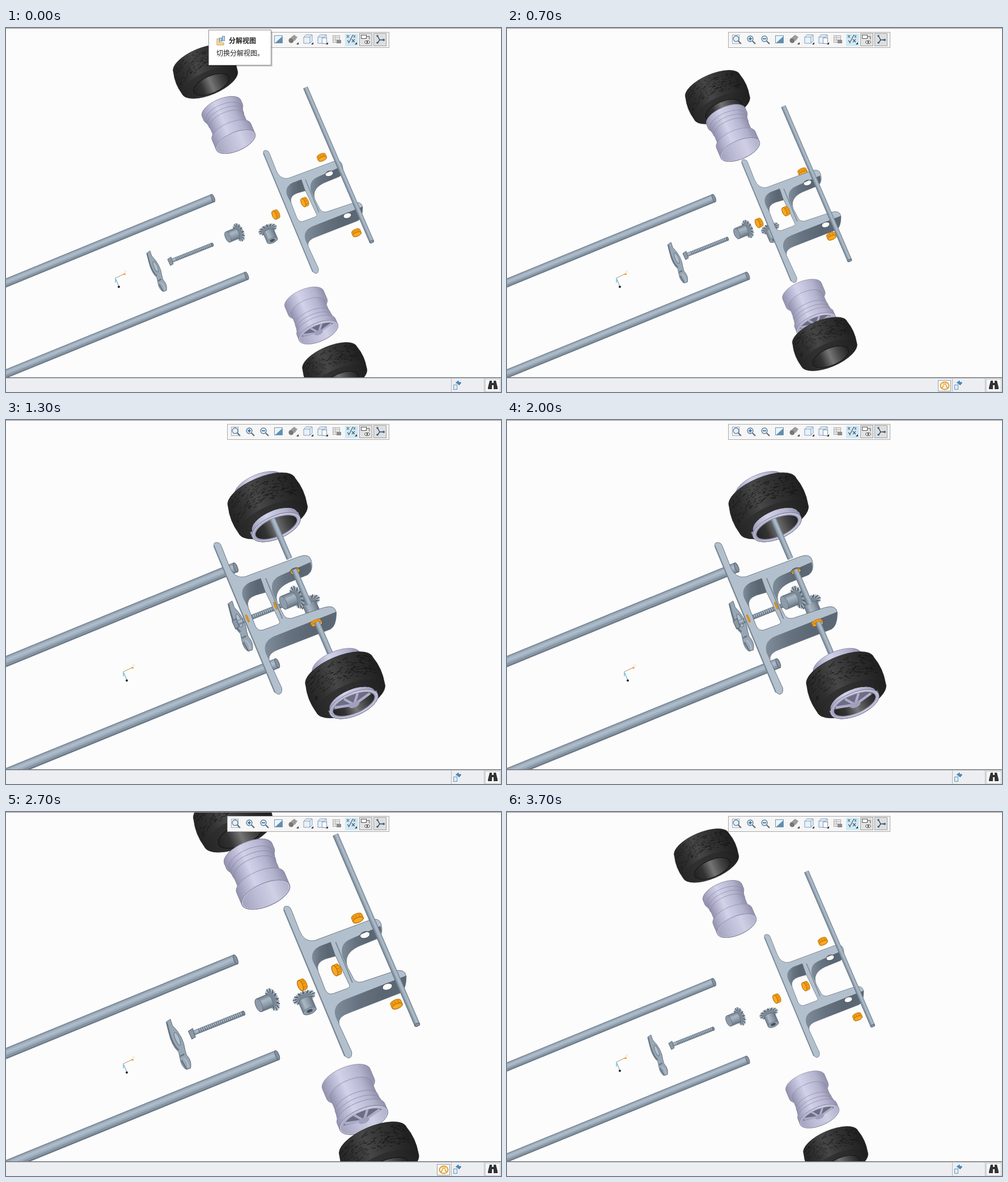
An HTML page that plays this animation: 873x642 px, repeating every 3800 ms.

```html
<!DOCTYPE html>
<html lang="zh">
<head>
<meta charset="utf-8">
<style>
html, body { margin: 0; width: 100%; height: 100%; overflow: hidden; background: #fcfcfc; }
svg { display: block; }
text { font: 12px "Noto Sans CJK SC", "Noto Sans CJK", sans-serif; fill: #222; }
</style>
</head>
<body>
<svg id="stage" width="873" height="642" viewBox="0 0 873 642" fill="none"></svg>
<script>
const LOOP = 3800;
const ZOOM = 1.2333;
const TILT = -23;
const EDGE = '#5d6975';

// Travel of each part from exploded to assembled.
const travel = {
  bracket: [-120, 48.5], axle: [-122, 99],
  tyreA: [59, 135], hubA: [18, 42], tyreB: [-58, -134], hubB: [-17, -41],
  bearing1: [-107, 77], bearing2: [-105, 48], bearing3: [-94, 44], bearing4: [-138, 18],
  gear1: [42, -18], gear2: [8, -6], bolt: [75, -31], arm: [106, -45]
};

let seed = 7;
const random = () => (seed = (seed * 16807) % 2147483647) / 2147483647;

const part = (name, body) => `<g data-part="${name}">${body}</g>`;
const place = (x, y, angle, body) => `<g transform="translate(${x} ${y}) rotate(${angle})">${body}</g>`;
const rect = (x, y, w, h, fill, stroke = 'none') =>
  `<rect x="${x}" y="${y}" width="${w}" height="${h}" fill="${fill}" stroke="${stroke}"/>`;
const path = (d, fill, stroke = 'none', w = 1, more = '') =>
  `<path d="${d}" fill="${fill}" stroke="${stroke}" stroke-width="${w}" ${more}/>`;
const oval = (x, y, rx, ry, fill, stroke = 'none', more = '') =>
  `<ellipse cx="${x}" cy="${y}" rx="${rx}" ry="${ry}" fill="${fill}" stroke="${stroke}" ${more}/>`;

function gradient(id, ...stops) {
  const list = stops.map((c, i) => `<stop offset="${i / (stops.length - 1)}" stop-color="${c}"/>`);
  return `<linearGradient id="${id}">${list.join('')}</linearGradient>`;
}

function tube(x1, y1, x2, y2, w, capRx) {
  const len = Math.hypot(x2 - x1, y2 - y1), nx = (y2 - y1) / len, ny = (x1 - x2) / len;
  const line = (shift, width, color) => {
    const dx = nx * shift * w, dy = ny * shift * w;
    return path(`M${x1 + dx} ${y1 + dy}L${x2 + dx} ${y2 + dy}`, 'none', color, width);
  };
  const angle = Math.atan2(y2 - y1, x2 - x1) * 180 / Math.PI;
  return line(0, w, '#687582') + line(.04, w * .84, '#8695a4') + line(.1, w * .55, '#9dadbc') +
    line(.12, w * .25, '#acbac9') +
    place(x2, y2, angle, oval(0, 0, capRx, w / 2 - .4, '#8492a0', EDGE, 'class="cap"'));
}

// Cylinder section seen from its lower end.
const band = (y0, y1, r, fill, squash = .445) =>
  path(`M${-r} ${y0}A${r} ${r * squash} 0 0 1 ${r} ${y0}V${y1}A${r} ${r * squash} 0 0 1 ${-r} ${y1}Z`,
    fill, '#85859e', .6);

function hub(x, y, spoked) {
  const sections = spoked
    ? [[-32, -16, 37], [-15, 5, 32], [6, 13, 33], [14, 20, 34], [22, 32, 37]]
    : [[-32, -24, 37], [-23, -17, 34], [-16, -10, 33], [-9, 12, 32], [13, 32, 37]];
  let body = sections.map(([a, b, r]) => band(a, b, r, 'url(#lavender)')).join('');
  body += oval(0, 32, 37, 16.5, '#c6c6df', '#77778f', 'stroke-width=".7"');
  body += oval(0, 32, 35.5, 15.2, 'url(#bowl)');
  body += oval(0, 32, 32, 13.2, 'url(#well)', '#8b8ba6', 'class="core"');
  if (spoked) {
    body += path('M-30 28A32 13 0 0 1 30 28L0 34Z', '#6d6d84');
    body += path('M0 33L-27 26M0 33L-10 20M0 33L11 20M0 33L27 27', 'none', '#adadca', 3.5);
    body += oval(0, 33, 8, 4, '#a0a0bd');
  }
  return place(x, y, TILT, body);
}

const casing = 'M-52-20A52 21 0 0 1 52-20Q58 0 53 21A53 22 0 0 1-53 21Q-58 0-52-20Z';

function tyre(x, y) {
  let tread = '';
  for (let i = 0; i < 170; i++) {
    const u = random() * 1.86 - .95;
    const v = random() * 31 - 17 - 19 * Math.sqrt(1 - u * u);
    tread += `M${(52 * u).toFixed(1)} ${v.toFixed(1)}l${(2 + random() * 3).toFixed(1)} ${(2.5 * u).toFixed(1)}`;
  }
  return place(x, y, TILT, path(casing, 'url(#rubber)', '#202020', .6) +
    path(tread, 'none', '#161616', .7, 'clip-path="url(#casing)"') +
    oval(0, 22, 51, 20.5, 'url(#shoulder)') + oval(1, 26, 34, 15, 'url(#well)', '#151515'));
}

function gear(x, y, angle, bored) {
  let body = oval(0, -4, 14, 8, '#7b8997');
  for (let i = 0; i < 26; i++) {
    const a = i * Math.PI / 13, c = Math.cos(a), s = Math.sin(a);
    body += path(`M${c * 11} ${-4 + s * 5}L${c * 17} ${-4 + s * 9}`, 'none', i % 2 ? '#a3b1be' : '#53606c', 1.7);
  }
  body += path('M-10-1Q0-6 10-1V17A10 4.5 0 0 1-10 17Z', 'url(#steel)', EDGE, .6);
  body += oval(0, 17, 10, 4.5, '#8d9baa', EDGE, 'stroke-width=".6"');
  if (bored) body += oval(0, 17, 4.5, 2.2, '#46515c');
  return place(x, y, angle, body);
}

function bearing(name, x, y, angle, seat) {
  let body = path('M-8-3A8 3.5 0 0 1 8-3V3A8 3.5 0 0 1-8 3Z', '#f59c10', '#a86a08', .7);
  body += path('M-5-5V2M-1-5V2M4-5V2', 'none', '#c97c08', .8);
  body += oval(0, 3, 8, 3.5, '#f9a71f', '#9a620c', 'stroke-width=".7"');
  return part(name, place(x, y, angle, `<g class="ring" data-seat="${seat}">${body}</g>`));
}

function bracket() {
  const outline = 'M454 221Q453 215 459 216Q463 216 465 222L476 250Q483 268 498 265L576 236Q590 231 593 241' +
    'Q597 256 588 262L561 273Q538 284 545 303L554 320Q558 326 566 324L611 309Q627 304 629 316' +
    'Q629 336 620 340L548 368Q530 374 533 385L551 424Q552 433 546 433L541 430Z';
  const opening = 'M503 309Q499 296 514 291L528 287L548 329Q549 332 543 334L524 341Q517 343 513 335Z';
  const eye = (x, y) => `M${x - 7} ${y + 2}a7 4.5-18 0 1 14-4a7 4.5-18 0 1-14 4Z`;
  const eyeA = eye(570, 257), eyeB = eye(602, 331);
  const wall = d => path(d, 'url(#wall)', 'none', 1, 'fill-rule="evenodd"');
  return path(outline + opening + eyeA + eyeB, '#b2c0ce', EDGE, .7, 'fill-rule="evenodd"') +
    wall('M496 296Q490 281 505 273L521 267L528 287L514 291Q499 296 503 309Z') +
    wall('M545 303L538 288Q533 270 549 263L592 244Q596 256 588 262L561 273Q538 284 545 303Z' + eyeA) +
    wall('M533 385L528 374Q523 358 540 350L629 315Q629 336 620 340L548 368Q530 374 533 385Z' + eyeB) +
    path('M454 221L541 430', 'none', '#7a8794', 1.8) + path('M528 267L552 325', 'none', '#7a8794', 1.5) +
    path(eyeA + eyeB, 'none', '#3f4953', .7);
}

const bolt = () =>
  tube(291, 411, 364, 382, 7, 1.5) +
  path('M300 407.5L362 383', 'none', '#5d6a77', 6, 'stroke-dasharray="1 2"') +
  path('M285 408L291 404L295 416L290 419Z', '#8b99a7', EDGE);

const arm = () =>
  path('M248 397L254 393L257 402Q273 418 275 437L277 444Q285 452 283 463L277 465Q270 461 268 450L266 440Q256 431 252 413Z', '#98a7b5', EDGE, .8) +
  path('M249 398Q256 430 266 437M268 446L274 443M270 452L277 464', 'none', '#66737f', 2) +
  oval(264, 421, 3, 10, '#b0bdca', '#707d8a', 'transform="rotate(-22 264 421)"') +
  path('M273 449Q279 453 280 462', 'none', '#b0bcc8', 2);

function toolbar() {
  const lens = (x, mark) => oval(x - 1, 19, 5, 5, '#e4f0fa', '#5d7a92', 'stroke-width="1.3"') +
    path(`M${x + 3} 23l5 5`, 'none', '#5b6977', 2.2) + path(mark, 'none', '#1f5f9c', 1.6);
  const cube = x => path(`M${x - 7} 16l4-4h11v11l-4 4h-11z`, '#e9f1f8', '#7c9dbe') +
    path(`M${x - 7} 16h11v11M${x + 4} 16l4-4`, 'none', '#7c9dbe');
  const drop = x => path(`M${x + 6} 29h4v-4z`, '#333');
  return rect(390.5, 7.5, 285, 27, '#f6f6f6', '#a9a9a9') +
    rect(598, 10, 23, 22, '#cdeafa') + rect(623.5, 9.5, 22, 22, '#e3e3e3', '#a0a0a0') +
    rect(648.5, 9.5, 22, 22, '#dedede', '#a0a0a0') +
    rect(397.5, 12.5, 12, 15, '#fff', '#9aa7b3') + lens(405, '') +
    lens(430, 'M426 19h6M429 16v6') + lens(455, 'M451 19h6') +
    rect(473.5, 13.5, 14, 13, '#eaf4fb', '#7895ad') + path('M475 26L487 15V26Z', '#5c8fb3') +
    oval(503, 22, 4.5, 4.5, '#777') + path('M502 17l6-5 6 4-5 7z', '#9b9b9b') + drop(506) +
    cube(532) + drop(532) + cube(557) + rect(557.5, 17.5, 8, 10, '#fff', '#8299ae') + drop(558) +
    rect(576.5, 13.5, 12, 12, '#ececec', '#aaa') + path('M577 17h11M577 21h11M581 14v11', 'none', '#b4b4b4') +
    rect(583, 21, 8, 6, '#8b8b8b') +
    path('M601 13l4 4m0-4l-4 4M612 12l-8 15M613 13l3 4m0-4l-3 4M610 20l5 5m0-5l-5 5M602 22l3 3', 'none', '#555', 1.2) + drop(609) +
    rect(626.5, 12.5, 9, 6, '#fff', '#555') + path('M636 15h5v5', 'none', '#555') +
    oval(637, 25, 4.5, 2.5, '#fff', '#444') + oval(637, 25, 1.4, 1.4, '#333') +
    path('M655 14l4 7-4 6M659 21h7', 'none', '#345', 1.4) +
    oval(655, 14, 1.8, 1.8, '#346a95') + oval(655, 26, 1.8, 1.8, '#346a95') + oval(666, 21, 2, 2, '#346a95');
}

const statusBar = () =>
  rect(0, 616, 873, 26, '#eceef1') + rect(0, 616, 873, 1.5, '#6e7276') +
  path('M785.5 618V642M843.5 618V642', 'none', '#b5b8bc') +
  rect(789.5, 629.5, 6, 8, '#dcebf6', '#6b9abf') +
  path('M793 626l5-4v3h4l-3 4M803 625l-4 5v-2h-3', '#4d8cbd', '#35719f', .8) +
  rect(845.5, 619.5, 26, 22, '#f6f7f8', '#c5c8cc') +
  path('M853 622h4v4h3v-4h4l3 12v3h-7v-7h-3v7h-7v-3z', '#333') +
  `<g id="busy">${rect(760.5, 621.5, 22, 19, '#f8f8f8', '#9da1a5')}` +
  oval(772, 631, 7.5, 6.5, '#fff6df', '#dd9a2a', 'stroke-width="1.8"') +
  path('M767 636l3-6m7 6l-3-6M769 628h6', 'none', '#d8902a', 1.5) + '</g>';

const tooltip = () => '<g id="tip">' + rect(360, 6, 110, 62, '#0003') + rect(357.5, 3.5, 110, 62, '#fff', '#8f8f8f') +
  path('M372 19v11h12v-4h-8v-7z', '#f6dda4', '#c89a45') +
  rect(376.5, 17.5, 4, 6, '#b9d3ea', '#6b93b7') + rect(381.5, 14.5, 4, 8, '#b9d3ea', '#6b93b7') +
  '<text x="393" y="27" style="font-weight:700">分解视图</text><text x="371" y="49">切换分解视图。</text></g>';

const triad = () => '<g id="triad">' + path('M193 441L210 433', 'none', '#b98d58') +
  path('M193 441L199 456', 'none', '#4d99b8') + path('M193 441V449', 'none', '#8fd0e8', 2) +
  oval(209, 434, 2, 1.5, '#f09a2a') + oval(211, 430, 3, 3, '#fbeeee') + oval(199, 456.5, 2, 2, '#222') + '</g>';

const sleeve = 'M-200 26H-34A34 15 0 0 1 36 26H200V300H-200Z';
const clip = (id, d) => `<clipPath id="${id}"><path d="${d}"/></clipPath>`;
const stage = document.getElementById('stage');
stage.innerHTML = '<defs>' +
  gradient('rubber', '#232323', '#303030', '#474747', '#363636', '#2a2a2a', '#1f1f1f') +
  gradient('shoulder', '#262626', '#323232', '#2c2c2c', '#202020') +
  gradient('well', '#232323', '#333', '#757575', '#454545', '#222') +
  gradient('lavender', '#9292ae', '#b4b4d0', '#d2d2e9', '#c4c4de', '#b2b2cd', '#9090ac') +
  gradient('bowl', '#a3a3be', '#bdbdd8', '#cfcfe5', '#b0b0cb') +
  gradient('steel', '#6b7884', '#aab7c4', '#8e9caa', '#65727e') +
  gradient('wall', '#7f8c9a', '#66727f', '#5a6672', '#5c6874') +
  clip('casing', casing) + clip('mouthA', sleeve) + clip('mouthB', sleeve) + '</defs>' +
  rect(0, 0, 873, 642, '#fcfcfc') + '<g id="scene">' +
  tube(-30, 462, 365, 300, 15, 2.5) + tube(-30, 622, 424.5, 437, 15, 2.5) +
  part('gear2', gear(463, 359, TILT, true)) + part('arm', arm()) + part('bolt', bolt()) +
  part('gear1', gear(407, 362, 67, false)) + bearing('bearing1', 557, 228, TILT, '.95 .65') +
  part('bracket', bracket()) +
  bearing('bearing2', 527, 307, 67, '.7 .2') + bearing('bearing3', 476, 329, 67, '.7 .2') +
  bearing('bearing4', 618, 361, TILT, '.95 .65') +
  part('hubA', hub(392.5, 171, false)) + part('tyreA', tyre(351, 76)) +
  `<g clip-path="url(#mouthA)">${part('hubA', hub(392.5, 171, false))}</g>` +
  part('axle', tube(528, 105, 645, 377, 8.5, 2)) +
  part('hubB', hub(538.5, 507, true)) + part('tyreB', tyre(579, 601)) +
  `<g id="rimB" clip-path="url(#mouthB)">${part('hubB', hub(538.5, 507, true))}</g>` +
  '</g>' + triad() + rect(0, 0, 873, 1, '#8e8e8e') + toolbar() + statusBar() + tooltip();

const find = selector => stage.querySelector(selector);
const all = selector => [...stage.querySelectorAll(selector)];
const show = (el, on) => el.setAttribute('visibility', on ? 'visible' : 'hidden');
const parts = all('[data-part]'), rings = all('.ring'), cores = all('.core');
const axleLines = all('[data-part=axle] path'), axleCap = find('[data-part=axle] .cap');
const mouths = [['#mouthA path', 'tyreA', 351, 76], ['#mouthB path', 'tyreB', 579, 601]]
  .map(([selector, ...rest]) => [find(selector), ...rest]);

// Assembly advances in sixths, one per tick; the way back pauses once at half.
function assembly(tick) {
  if (tick < 20) return Math.min(1, Math.max(0, (tick - 5) / 6));
  if (tick < 25) return Math.min(1, (27 - tick) / 6);
  return Math.max(0, (28 - tick) / 6);
}

function draw(ms) {
  const tick = Math.floor((ms % LOOP) / 100);
  const p = assembly(tick), joined = p === 1;
  const zoomed = tick >= 12 && tick < 29;
  const offset = name => `translate(${travel[name][0] * p} ${travel[name][1] * p})`;

  find('#scene').setAttribute('transform', zoomed ? `matrix(${ZOOM} 0 0 ${ZOOM} -45.2 -110)` : '');
  find('#triad').setAttribute('transform', zoomed ? 'translate(14 3)' : '');
  for (const el of parts) el.setAttribute('transform', offset(el.dataset.part));
  for (const [el, name, x, y] of mouths) {
    el.setAttribute('transform', `${offset(name)} translate(${x} ${y}) rotate(${TILT})`);
  }
  // Once joined, the axle runs hidden through the arms and the gear.
  for (const el of axleLines) el.setAttribute('stroke-dasharray', joined ? '0 29 62 17 54 28 48 99' : 'none');
  show(axleCap, !joined);
  for (const el of rings) el.setAttribute('transform', joined ? `scale(${el.dataset.seat})` : '');
  for (const el of cores) el.setAttribute('display', joined ? 'inline' : 'none');
  find('#rimB').setAttribute('display', joined ? 'inline' : 'none');
  show(find('#busy'), (tick >= 4 && tick < 12) || (tick >= 21 && tick < 29));
  show(find('#tip'), tick < 4);
}

const start = performance.now();
function loop() {
  draw(performance.now() - start);
  requestAnimationFrame(loop);
}
loop();
</script>
</body>
</html>
```
